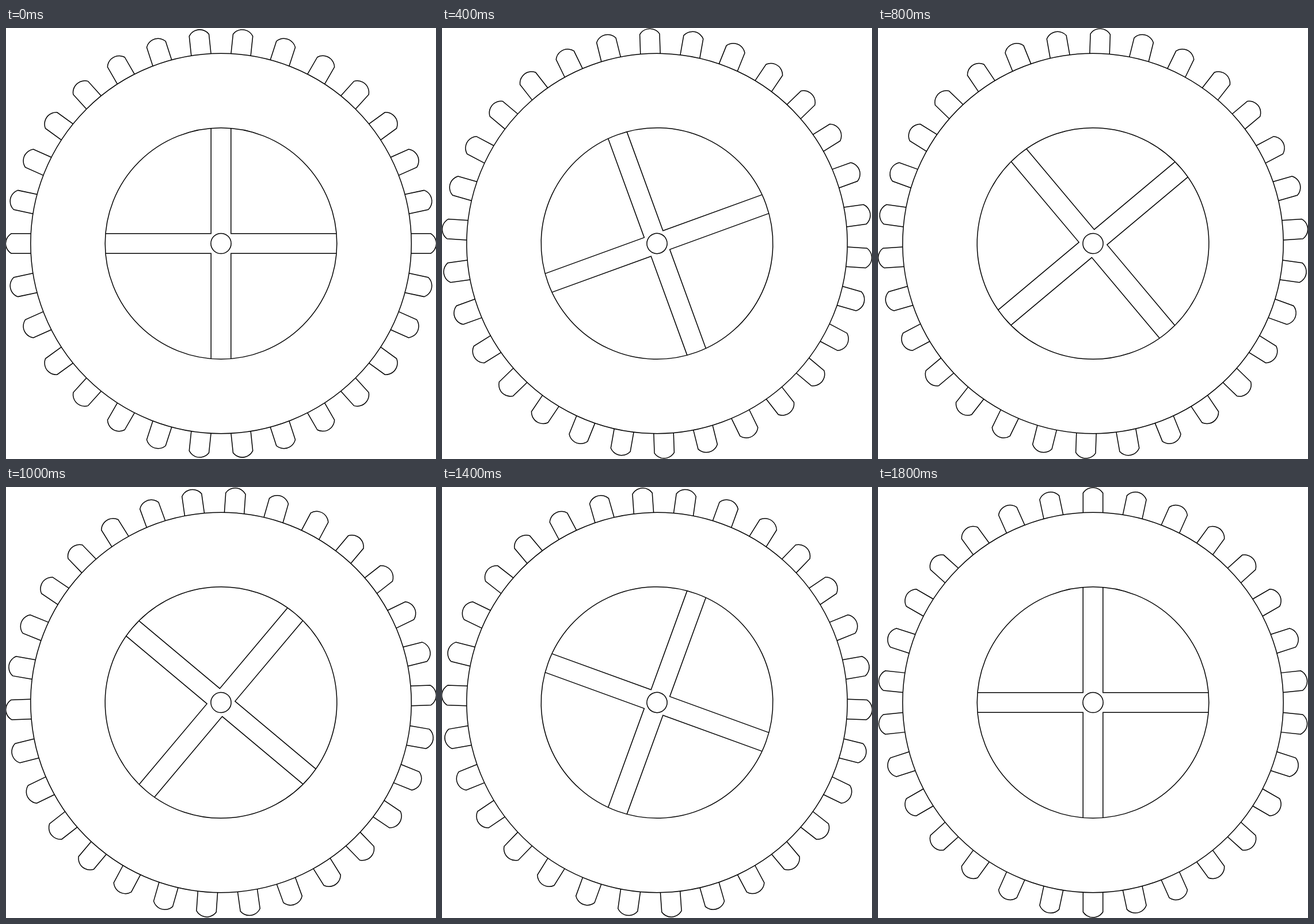
An HTML page with a canvas that plays this animation: 747 by 750 pixels, repeating every 1.9 s.

```html
<!DOCTYPE html>
<html lang="en">
<head>
<meta charset="utf-8">
<title>Turning gear</title>
<style>
  html, body { margin: 0; width: 100%; height: 100%; overflow: hidden; background: #fff; }
  canvas { display: block; }
</style>
</head>
<body>
<canvas id="stage" width="747" height="750"></canvas>
<script>
const ctx = document.getElementById('stage').getContext('2d');
const DEG = Math.PI / 180;
const CENTER = { x: 373.5, y: 375 };
const STEP_MS = 100, STEPS = 19, STEP_ANGLE = -5 * DEG;
const RIM = 330.7, WINDOW = 201.3, HUB = 17.6;
const TEETH = 30, TOOTH_HALF = 17.2, SHOULDER = 364.5, TIP = 374;
const SPOKE_HALF = 17.3;

const rise = TIP - SHOULDER;
const capRadius = (TOOTH_HALF ** 2 + rise ** 2) / (2 * rise);
const capAngle = Math.asin(TOOTH_HALF / capRadius);
const chordEnd = (radius, half) => Math.sqrt(radius ** 2 - half ** 2);

function circle(radius) {
  ctx.beginPath();
  ctx.arc(0, 0, radius, 0, 2 * Math.PI);
  ctx.stroke();
}

function tooth() {
  const base = chordEnd(RIM, TOOTH_HALF);
  ctx.beginPath();
  ctx.moveTo(base, -TOOTH_HALF);
  ctx.lineTo(SHOULDER, -TOOTH_HALF);
  ctx.arc(TIP - capRadius, 0, capRadius, -capAngle, capAngle);
  ctx.lineTo(base, TOOTH_HALF);
  ctx.stroke();
}

// The two spoke edges that bound one quarter of the window.
function quarter() {
  const end = chordEnd(WINDOW, SPOKE_HALF);
  ctx.beginPath();
  ctx.moveTo(end, SPOKE_HALF);
  ctx.lineTo(SPOKE_HALF, SPOKE_HALF);
  ctx.lineTo(SPOKE_HALF, end);
  ctx.stroke();
}

function around(count, part) {
  for (let i = 0; i < count; i++) {
    ctx.save();
    ctx.rotate(i * 2 * Math.PI / count);
    part();
    ctx.restore();
  }
}

function draw(time) {
  const step = Math.floor(time / STEP_MS) % STEPS;
  ctx.fillStyle = '#fff';
  ctx.fillRect(0, 0, 747, 750);
  ctx.save();
  ctx.translate(CENTER.x, CENTER.y);
  ctx.rotate(step * STEP_ANGLE);
  ctx.strokeStyle = '#000';
  ctx.lineWidth = 1.5;
  [RIM, WINDOW, HUB].forEach(circle);
  around(TEETH, tooth);
  around(4, quarter);
  ctx.restore();
}

let start;
function tick(now) {
  start ??= now;
  draw(Math.max(0, now - start));
  requestAnimationFrame(tick);
}
draw(0);
requestAnimationFrame(tick);
</script>
</body>
</html>
```
